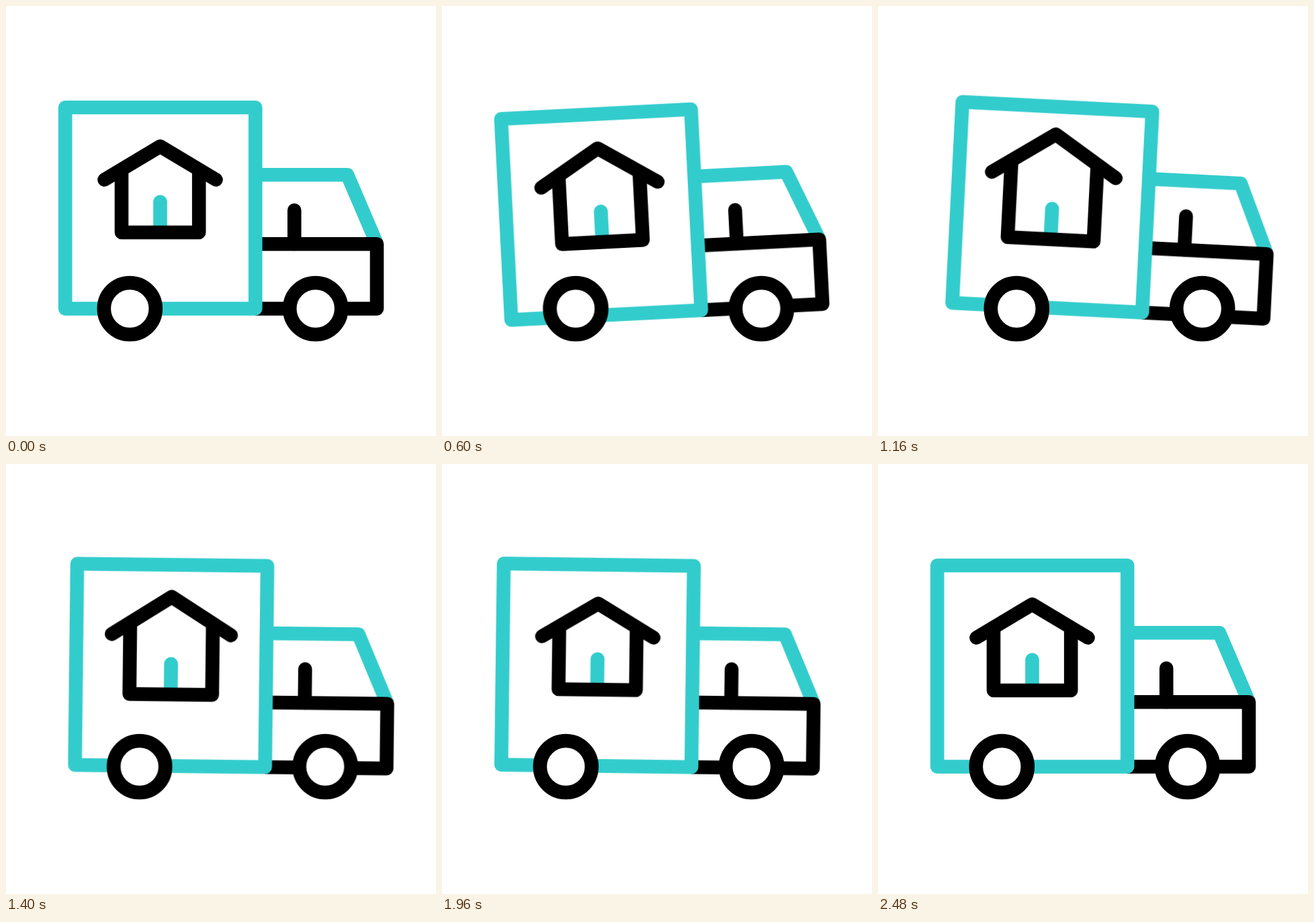
These frames come from a looping animation (640x640 px, 2.64 s). An HTML page:

```html
<!DOCTYPE html>
<html lang="en">
<head>
<meta charset="utf-8">
<title>Moving truck</title>
<style>
  html, body { margin: 0; width: 100%; height: 100%; overflow: hidden; background: #fff; }
  svg { display: block; width: 100%; height: 100%; }
  path, rect, circle {
    fill: none; stroke: #000; stroke-width: 20.6;
    stroke-linejoin: round; vector-effect: non-scaling-stroke;
  }
  .teal { stroke: #33cccc; }
  .cap { stroke-linecap: round; }
  .wheels circle { fill: #fff; }

  .drive, .bob, .tilt, .grow, .drop { animation: 2640ms ease-in-out infinite; }
  .drive { animation-name: drive; }
  .bob { animation-name: bob; }
  .tilt { animation-name: tilt; transform-origin: 320px 450.5px; }
  .grow { animation-name: grow; transform-origin: 229.5px 284.5px; }
  .drop { animation-name: drop; }

  @keyframes drive {
    0%, 6.44% { transform: translateX(0); }
    33.71%, 43.94% { transform: translateX(22px); }
    66.29%, 100% { transform: translateX(0); }
  }
  @keyframes bob {
    0%, 1.52% { transform: translateY(0); }
    21.21%, 36.36% { transform: translateY(4.9px); }
    54.55%, 100% { transform: translateY(0); }
  }
  @keyframes tilt {
    0%, 2.27% { transform: rotate(0deg); }
    21.21% { transform: rotate(-2.97deg); }
    44.7% { transform: rotate(2.92deg); }
    62.12% { transform: rotate(-1.95deg); }
    77.65% { transform: rotate(1deg); }
    93.94%, 100% { transform: rotate(0deg); }
  }
  @keyframes grow {
    0%, 15.15% { transform: scale(1, 1); }
    32.58%, 40.91% { transform: scale(1.115, 1.225); }
    68.18%, 100% { transform: scale(1, 1); }
  }
  @keyframes drop {
    0%, 15.15% { transform: translateY(0); }
    32.58%, 40.91% { transform: translateY(11.8px); }
    68.18%, 100% { transform: translateY(0); }
  }
</style>
</head>
<body>
<svg viewBox="0 0 640 640">
  <g class="drive">
    <g class="bob">
      <g class="tilt">
        <!-- cab -->
        <path class="teal" d="M371 251.2H508L552 354"/>
        <path d="M371 354.2H552V450.5H371"/>
        <path class="cap" d="M429.2 304V354"/>
        <!-- cargo box -->
        <rect class="teal" x="88.2" y="151" width="283" height="299.5"/>
        <!-- house -->
        <path class="teal cap drop" d="M229.5 291.5V335"/>
        <g class="grow">
          <path d="M172 245V337H287.2V245"/>
          <path class="cap" d="M146.5 258.5L229.5 208.8L312.5 258.5"/>
        </g>
      </g>
    </g>
    <g class="wheels">
      <circle cx="184.3" cy="450.5" r="38.5"/>
      <circle cx="460.7" cy="450.5" r="38.5"/>
    </g>
  </g>
</svg>
</body>
</html>
```
